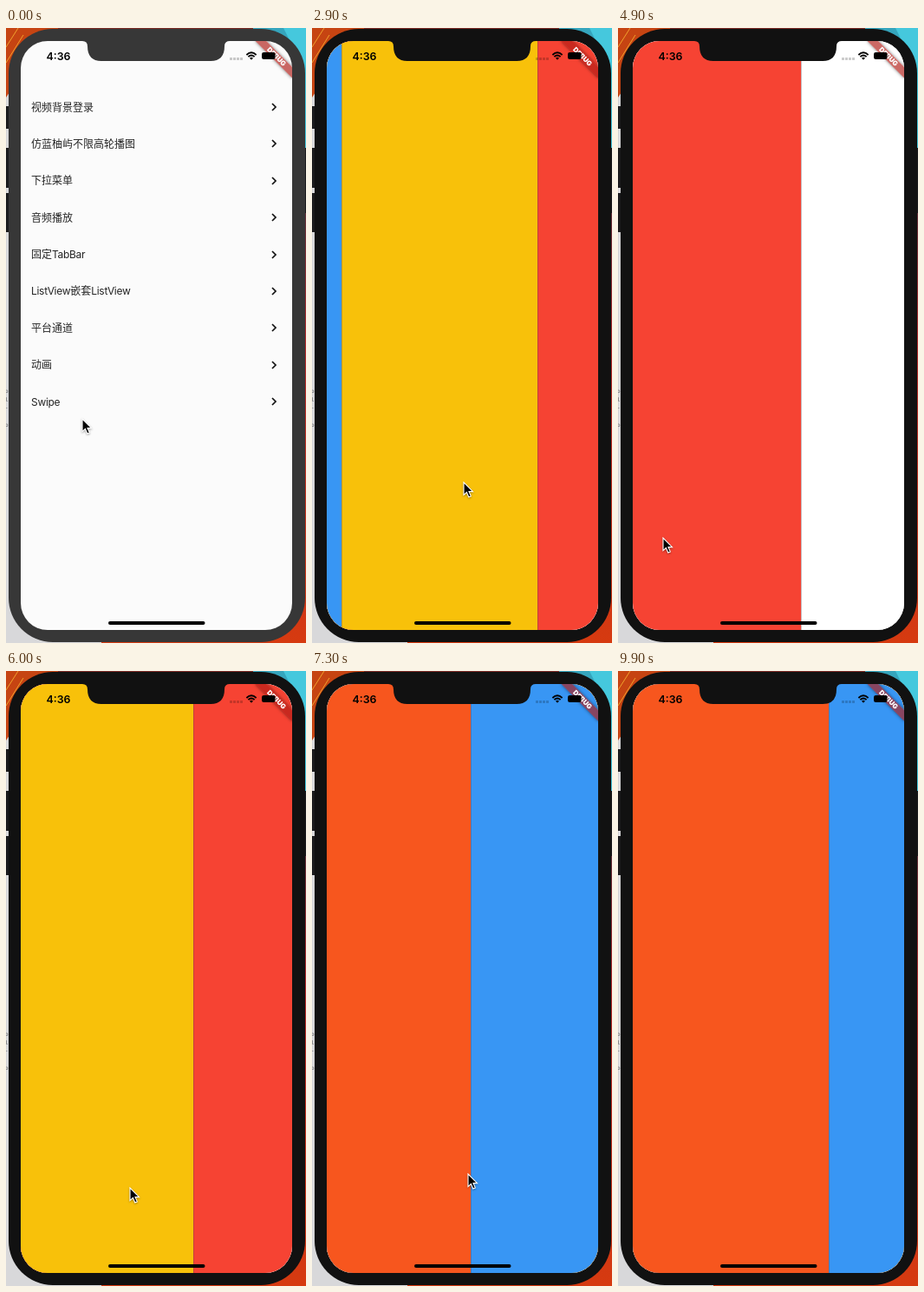
These frames come from a looping animation (346x708 px, 10 s). An HTML page:

```html
<!DOCTYPE html>
<html lang="zh">
<head>
<meta charset="utf-8">
<title>Swipe demo</title>
<style>
html, body { margin: 0; width: 100%; height: 100%; overflow: hidden; }
#stage { position: relative; width: 346px; height: 708px; overflow: hidden; background: #d8d8da; }
#stage > svg { position: absolute; left: 0; top: 0; }
#phone { position: absolute; left: 2.5px; top: 1px; width: 342px; height: 705.5px; border-radius: 51px; background: #373737; }
#phone.dark { background: #111; }
#screen { position: absolute; left: 17px; top: 15px; width: 313px; height: 678px; border-radius: 31px; overflow: hidden; background: #fbfbfb; }
#list { position: absolute; inset: 0; color: #242424; font: 12px/42.375px Inter, "Noto Sans CJK SC", "Noto Sans CJK", sans-serif; }
.row { position: absolute; left: 12px; right: 12px; white-space: nowrap; }
.row span { letter-spacing: -.3px; }
.row svg { position: absolute; right: 5px; top: 15.5px; }
#pages { position: absolute; inset: 0; background: #fff; }
#pages div { position: absolute; left: 0; top: 0; height: 100%; box-shadow: 1px 0 rgba(90,70,80,.35); }
#red { background: #f64333; }
#amber { background: #f8c10a; }
#blue { background: #3896f4; }
#orange { background: #f7561e; }
#banner { position: absolute; left: 313px; top: 0; width: 0; height: 0; transform: rotate(45deg); }
#banner b {
  position: absolute; left: -30px; top: 21.2px; width: 60px; height: 9px;
  background: rgba(176,28,22,.66); box-shadow: 0 0 4px rgba(0,0,0,.5);
  color: #fff; font: 900 7.8px/9px Inter, sans-serif; text-align: center;
}
#cursor { filter: drop-shadow(0 1px 1px rgba(0,0,0,.35)); }
</style>
</head>
<body>
<div id="stage">
  <svg width="346" height="708">
    <defs>
      <linearGradient id="side" x2="0" y2="1">
        <stop stop-color="#63303a"/><stop offset=".3" stop-color="#b52a2c"/><stop offset="1" stop-color="#d63a10"/>
      </linearGradient>
    </defs>
    <path d="M0 0H290V20H40L0 80Z" fill="#c64412"/>
    <path d="M0 22L14 0M0 40L20 8" stroke="#efa02c" fill="none"/>
    <path d="M60 0H290V3H60Z" fill="#7c2a24"/>
    <path d="M285 0H346V140H325Z" fill="#45c8dd"/>
    <path d="M285 0H320L330 20H300Z" fill="#35a5bd"/>
    <path d="M110 704H290V640L338 210H346V708H110Z" fill="url(#side)"/>
    <path d="M0 90H8V116H0ZM0 138H8V184H0ZM0 190H8V235H0ZM338 138H346V213H338Z" fill="#1b1b1d"/>
    <g font-family="DejaVu Sans Mono, monospace" font-size="6" fill="#555">
      <text x="-1" y="420">o</text><text x="-1" y="430">l</text><text x="-1" y="439">-</text><text x="-1" y="459">o</text>
    </g>
  </svg>

  <div id="phone"></div>
  <div id="screen">
    <div id="list"></div>
    <div id="pages">
      <div id="red"></div><div id="amber"></div><div id="blue"></div><div id="orange"></div>
    </div>
    <div id="banner"><b>DEBUG</b></div>
  </div>

  <svg width="346" height="708">
    <path id="notch" d="M88 14H258V15Q252 15 252 21Q252 38 236 38H110Q94 38 94 21Q94 15 88 15Z"/>
    <text x="46.5" y="36.5" font-family="Inter, sans-serif" font-size="12.4" font-weight="600">4:36</text>
    <path d="M258 35.5H273" stroke="#000" stroke-opacity=".2" stroke-width="3" stroke-dasharray="3 1"/>
    <path d="M277.4 31Q283 25.6 288.6 31M279.4 33.2Q283 29.8 286.6 33.2" fill="none" stroke="#000" stroke-width="1.8"/>
    <path d="M281 34.6Q283 33 285 34.6L283 36.8Z"/>
    <rect x="295" y="28" width="15.5" height="8" rx="2.2"/>
    <path d="M311.3 30.5Q313 32 311.3 33.5Z" fill-opacity=".6"/>
    <rect x="118" y="683" width="111.5" height="4" rx="2"/>
  </svg>

  <svg id="cursor" width="16" height="22" viewBox="-1 -1 16 22">
    <path d="M0 0V14.6L3.4 11.5L5.8 17L8.3 15.9L6 10.6H10.5Z" stroke="#fff" stroke-width="1.1"/>
  </svg>
</div>

<script>
const LOOP = 10000, STEP = 100, WIDTH = 313, SWIPE = 674;
const el = id => document.getElementById(id);

const labels = ['视频背景登录', '仿蓝柚屿不限高轮播图', '下拉菜单', '音频播放', '固定TabBar',
  'ListView嵌套ListView', '平台通道', '动画', 'Swipe'];
el('list').innerHTML = labels.map((label, i) =>
  `<div class="row" style="top:${55.5 + i * 42.375}px">${label.replace(/[A-Za-z]+/g, '<span>$&</span>')}
   <svg width="8" height="10"><path d="M2 1L6 5L2 9" fill="none" stroke="#111" stroke-width="1.7"/></svg></div>`).join('');

// Eased progress from 0 to 1
function ease(t, start, length) {
  const p = Math.min(1, Math.max(0, (t - start) / length));
  return p * p * (3 - 2 * p);
}

// A short pull that springs back, strongest at its peak time
function tug(t, peak, depth) {
  return depth * Math.max(0, Math.cos(Math.PI * Math.min(1, Math.abs(t - peak) / 800)));
}

const swipe = (t, out, back) => WIDTH * (1 - ease(t, out, SWIPE) + ease(t, back, SWIPE));
const BACK = 5602;

const widths = {
  orange: t => swipe(t, 1400, BACK + 2 * SWIPE) - tug(t, 8600, 113) - tug(t, 9900, 87),
  blue: t => swipe(t, 2320, BACK + SWIPE),
  amber: t => swipe(t, 2693, BACK),
  red: t => WIDTH - tug(t, 3900, 103) - tug(t, 4900, 119)
};

// Pointer rests: [time, x, y]
const rests = [[0, 88, 450], [500, 50, 432], [1200, 250, 495], [1700, 134, 503],
  [2900, 175, 523], [4900, 52, 587], [6000, 143, 595], [7300, 180, 579], [9800, 350, 525]];

function pointer(t) {
  const i = rests.findIndex(rest => rest[0] > t);
  if (i < 0) return rests[rests.length - 1].slice(1);
  const [t0, x0, y0] = rests[i - 1], [t1, x1, y1] = rests[i];
  const p = ease(t, t0, t1 - t0);
  return [x0 + (x1 - x0) * p, y0 + (y1 - y0) * p];
}

function draw(t) {
  const shown = ease(t, 600, 400), dark = shown > 0;
  el('phone').classList.toggle('dark', dark);
  el('notch').setAttribute('fill', dark ? '#111' : '#373737');
  el('pages').style.transform = `translateX(${WIDTH * (1 - shown)}px)`;
  el('list').style.transform = `translateX(${-WIDTH / 3 * shown}px)`;
  for (const id in widths) el(id).style.width = Math.round(widths[id](t)) + 'px';
  const [x, y] = pointer(t);
  el('cursor').style.transform = `translate(${x - 1}px, ${y - 1}px)`;
}

const start = performance.now();
function tick() {
  const t = (performance.now() - start) % LOOP;
  draw(Math.floor(t / STEP) * STEP);
  requestAnimationFrame(tick);
}
tick();
</script>
</body>
</html>
```
